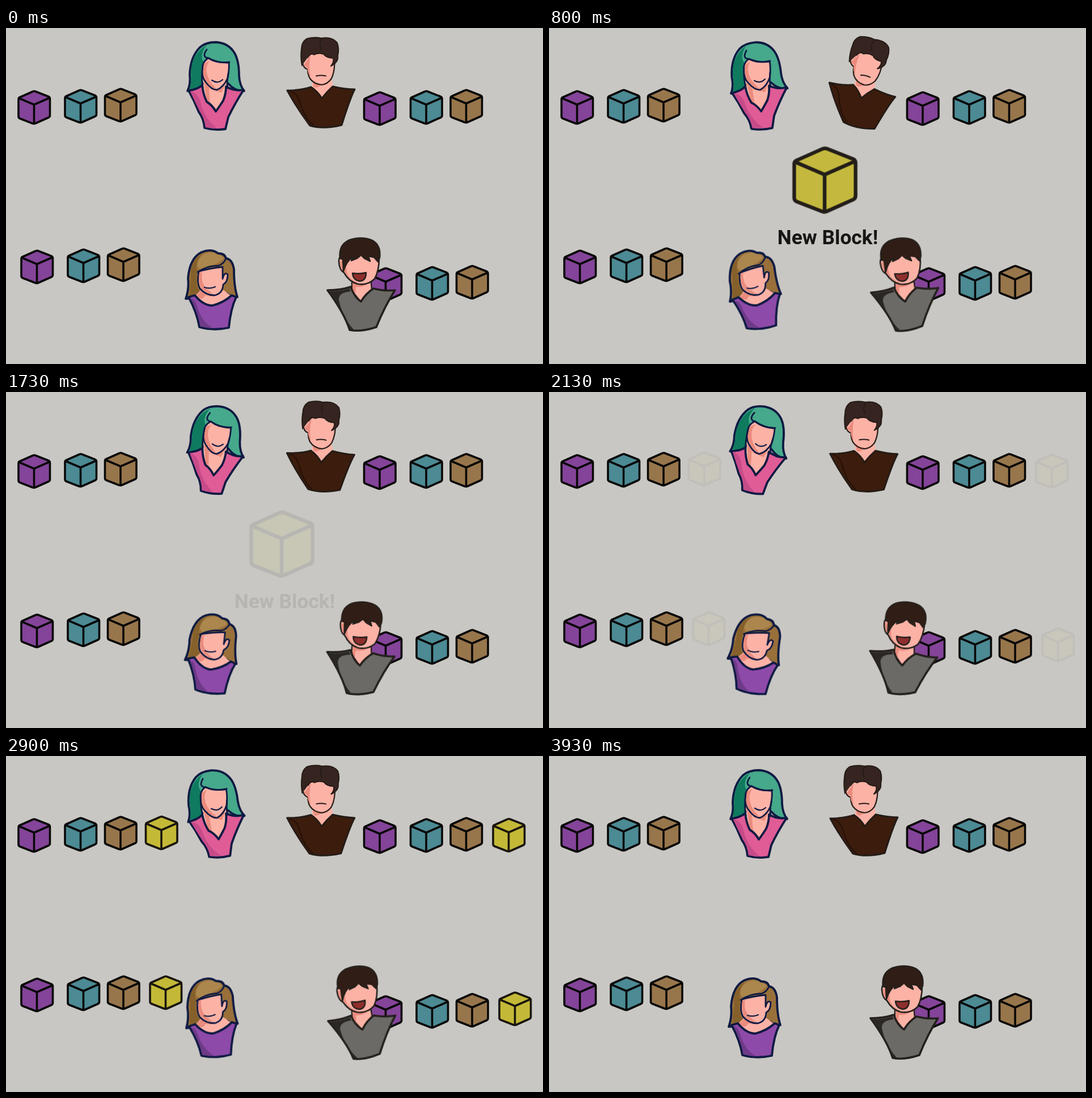
Write an HTML page that moves like this. It is 947 by 592 pixels and loops after 3.96 s.

```html
<!DOCTYPE html>
<html lang="en">
<head>
<meta charset="utf-8">
<title>New block</title>
<style>
html, body { margin: 0; width: 100%; height: 100%; overflow: hidden; background: #c9c7c3; }
svg { display: block; width: 947px; height: 592px; }
path { stroke-linejoin: round; stroke-linecap: round; }
.flat { stroke: none; }
.line { fill: none; }
.navy { stroke: #0e1a42; stroke-width: 3.8; }
.dark { stroke: #241b16; stroke-width: 3; }
.soot { stroke: #24201c; stroke-width: 3.6; }
.skin { fill: #fdb2a6; }
.shade { fill: #e98b7d; stroke: none; }
text { font: 700 35.3px Roboto, Arial, sans-serif; text-anchor: middle; fill: #0a0a08; }
</style>
</head>
<body>
<svg viewBox="0 0 947 592">
  <defs>
    <path id="cube" d="M-2.500-28Q.5-29.500 3-28L26-19Q28-18 28-15.500V14Q28 16.500 26 17.500L2.500 28Q0 29.500-2.500 28.200L-25 19.500Q-27.500 18.500-27.500 16V-14.500Q-27.500-17-25-18ZM0-5-27-16.500M0-5 27.500-17M0-5V28"/>
  </defs>
  <g id="chains" stroke="#080706" stroke-width="3.6"></g>
  <g id="added" stroke="#17130c" stroke-width="3.6" fill="#c4b935"></g>
  <g id="fresh">
    <use href="#cube" transform="translate(486 268) scale(1.95)" fill="#c4b935" stroke="#17130c" stroke-width="3.3"/>
    <text x="491.5" y="381">New Block!</text>
  </g>

  <g id="green" class="navy">
    <path fill="#46a98b" d="M320 111Q326 99 324 82 325 51 342 34 352 25 370 25 392 26 403 44 411 58 411 84 412 101 420 111 404 112 392 98H346Q338 108 320 111Z"/>
    <path class="flat" fill="#0f7a5e" d="M324 107Q328 90 326 76 329 44 354 30 340 47 349 61 343 80 346 102 335 107 324 107Z"/>
    <path class="skin flat" d="M347 90 353 130 370 147 384 128 390 90Z"/>
    <path class="shade" d="M349 94 354 129 360 136 358 106 374 109 388 95 380 114 361 108Z"/>
    <path fill="#df5c96" d="M322 110Q336 109 346 101 348 118 354 130 364 136 370 147 378 136 383 128 388 116 388 103 402 112 419 109 403 134 392 157L387 178Q368 181 350 176 349 160 340 148 332 128 322 110Z"/>
    <path class="flat" fill="#c64b89" d="M325 112Q336 112 342 127 348 158 372 177L352 175Q350 159 342 147 332 128 325 112Z"/>
    <path class="skin" stroke-width="2.8" d="M348 63Q343 84 352 95 362 109 372 109 384 104 391 88 394 72 393 61 374 62 357 53 350 57 348 63Z"/>
    <path class="shade" d="M349 63Q344 84 354 95 362 106 371 107 357 94 354 79 352 66 359 58Z"/>
    <path class="line" stroke-width="2.8" d="M347 65Q344 89 347 105M357 53Q372 63 394 60M354 38Q345 51 356 53M392 80Q389 96 391 106"/>
    <path class="line" stroke-width="2.2" d="M363 92Q373 99 382 91"/>
  </g>

  <g id="frown" class="dark">
    <path class="skin flat" d="M540 88V105L557 124 576 104 574 85Z"/>
    <path class="shade" d="M541 94Q555 104 571 94L548 105 543 104Z"/>
    <path fill="#3c1c0c" d="M496 110Q520 110 538 104 550 112 557 124 566 112 576 103 598 108 615 108 607 123 592 171 560 179 536 172 512 140 496 110Z"/>
    <path class="line" stroke="#241006" stroke-width="2" d="M501 112Q513 114 518 130 526 158 542 171"/>
    <path class="skin" stroke-width="2.2" d="M526 55 537 43H572L579 53Q581 74 574 89 567 99 557 100 543 99 536 89 532 82 532 73 523 70 523 59Z"/>
    <path class="shade" d="M531 57 537 48Q533 67 537 87 530 76 532 70L525 66Z"/>
    <path fill="#35241f" stroke-width="2" d="M522 66Q519 51 521 37 521 25 530 19 544 15 556 18 575 15 584 26 588 36 585 49 587 60 573 67 579 60 577 53 565 53 560 46 551 43 543 47 537 43 532 52 526 56L524 67Z"/>
    <path class="line" stroke-width="1.6" d="M557 19Q551 27 556 38"/>
    <path class="line" stroke-width="2" d="M547 84.500Q556 82.500 564 84.500"/>
  </g>

  <g id="brown" class="navy">
    <path fill="#99703a" d="M317 477Q323 460 321 441 324 405 345 395 362 388 374 397 386 397 388 406 399 407 402 425 402 456 408 474 400 477 390 468H345Q333 477 317 477Z"/>
    <path class="flat" fill="#85602b" d="M323 471Q327 440 326 425 330 406 346 399 333 413 337 429 333 451 342 464 334 472 323 471Z"/>
    <path class="flat" fill="#ab864d" d="M337 420Q337 403 352 397 367 393 372 399 383 400 384 407 363 422 342 425Z"/>
    <path class="skin flat" d="M344 461 333 473Q349 490 364 490 386 484 397 472L384 462Z"/>
    <path class="shade" d="M344 463 335 472Q347 482 351 471 367 476 382 464 367 470 344 463Z"/>
    <path fill="#8e4aa8" d="M322 474 333 471Q348 489 364 489 384 484 398 471L406 474Q396 495 393 528 366 534 341 527 337 502 322 474Z"/>
    <path class="flat" fill="#6e3a88" d="M326 477Q334 477 337 490 345 518 365 529L343 526Q338 501 326 477Z"/>
    <path class="skin" stroke-width="2.8" d="M340 429Q336 449 342 459 352 471 368 471 382 468 383 452 391 448 391 434 385 429 382 442L382 421Q360 423 340 429Z"/>
    <path class="shade" d="M341 432Q338 449 345 459 354 468 366 469 352 460 347 449 344 440 346 428Z"/>
    <path class="line" stroke-width="2.8" d="M338 430Q356 418 374 419 384 416 388 406"/>
    <path class="line" stroke-width="2.2" d="M350 457Q360 460 369 456"/>
  </g>

  <g id="laugh" class="soot">
    <path class="skin" stroke-width="2.4" d="M610 442V463L626 483 645 460 643 440Z"/>
    <path class="shade" d="M611 446Q626 457 642 447 632 458 617 456L616 470 611 463Z"/>
    <path fill="#6b6a66" d="M567 462Q590 462 608 456 614 474 626 482 634 468 648 459 668 464 686 462 668 490 653 527 626 536 606 532 597 503 567 462Z"/>
    <path class="flat" fill="#2b2724" d="M570 464Q588 464 606 459L608 464Q586 466 587 479 593 510 613 531L607 531Q597 503 570 464Z"/>
    <path class="skin" stroke-width="2.6" d="M594 405Q587 400 587 412 588 427 596 431 605 447 620 451 638 454 650 442 658 428 658 405L626 388Z"/>
    <path class="shade" d="M596 409 602 405Q597 424 604 437 612 446 624 450 608 447 598 430Q590 427 589 411Z"/>
    <path fill="#301d15" stroke-width="2.4" d="M595 429 594 408 589 406Q586 383 604 374 626 366 646 374 662 383 659 405L656 412 649 404 639 402 642 411 632 406 626 400 619 406 609 410 611 404Q600 411 595 429Z"/>
    <path fill="#8e2f2d" stroke-width="2.4" d="M611 432Q623 434 635 431 635 446 623 446 612 444 611 432Z"/>
  </g>
</svg>
<script>
const LOOP = 3.96, SWITCH = 1.92;
const $ = id => document.getElementById(id);
const cube = (x, y, fill) => `<use href="#cube" x="${x}" y="${y}"${fill ? ` fill="${fill}"` : ''}/>`;

// Each chain: origin, then the offset of its newest block
const chains = [[49.5, 140, 224.5, -4.5], [659, 142, 227.5, -2.5], [54.5, 421, 227, -4], [669.5, 452, 228, -6.5]];
for (const [x, y, dx, dy] of chains) {
  $('chains').innerHTML += cube(x, y, '#844499') + cube(x + 82, y - 2, '#4c8a94') + cube(x + 152.5, y - 4, '#98764c');
  $('added').innerHTML += cube(x + dx, y + dy);
}

const pulse = (t, from, to) => t < from || t > to ? 0 : Math.sin(Math.PI * (t - from) / (to - from)) ** 2;

// Smooth interpolation through [time, value] keys
function along(keys, t) {
  const i = Math.max(1, keys.findIndex(k => k[0] >= t));
  const [t0, a] = keys[i - 1], [t1, b] = keys[i];
  return a + (b - a) * (1 - Math.cos(Math.PI * (t - t0) / (t1 - t0))) / 2;
}
const sway = (t, dip) => along([[0, 0], [.27, .8], [.93, -1], [2.05, 1.2], [2.9, dip], [LOOP, 0]], t);
const tilt = (id, angle, x, y) => $(id).setAttribute('transform', `rotate(${angle} ${x} ${y})`);

function draw(now) {
  const t = now / 1000 % LOOP;
  const fresh = pulse(t, 0, SWITCH);
  $('fresh').setAttribute('opacity', fresh);
  $('added').setAttribute('opacity', pulse(t, 2, 2 + SWITCH));
  tilt('green', 6.3 * sway(t, -1), 370, 102);
  tilt('frown', 13.2 * fresh + 1.2 * Math.sin(Math.PI * t / LOOP), 555, 96);
  tilt('brown', 8 * sway(t, -.4), 362, 462);
  tilt('laugh', 4.8 * sway(t, -1), 627, 452);
}

const start = performance.now();
function tick() {
  draw(performance.now() - start);
  requestAnimationFrame(tick);
}
tick();
</script>
</body>
</html>
```
